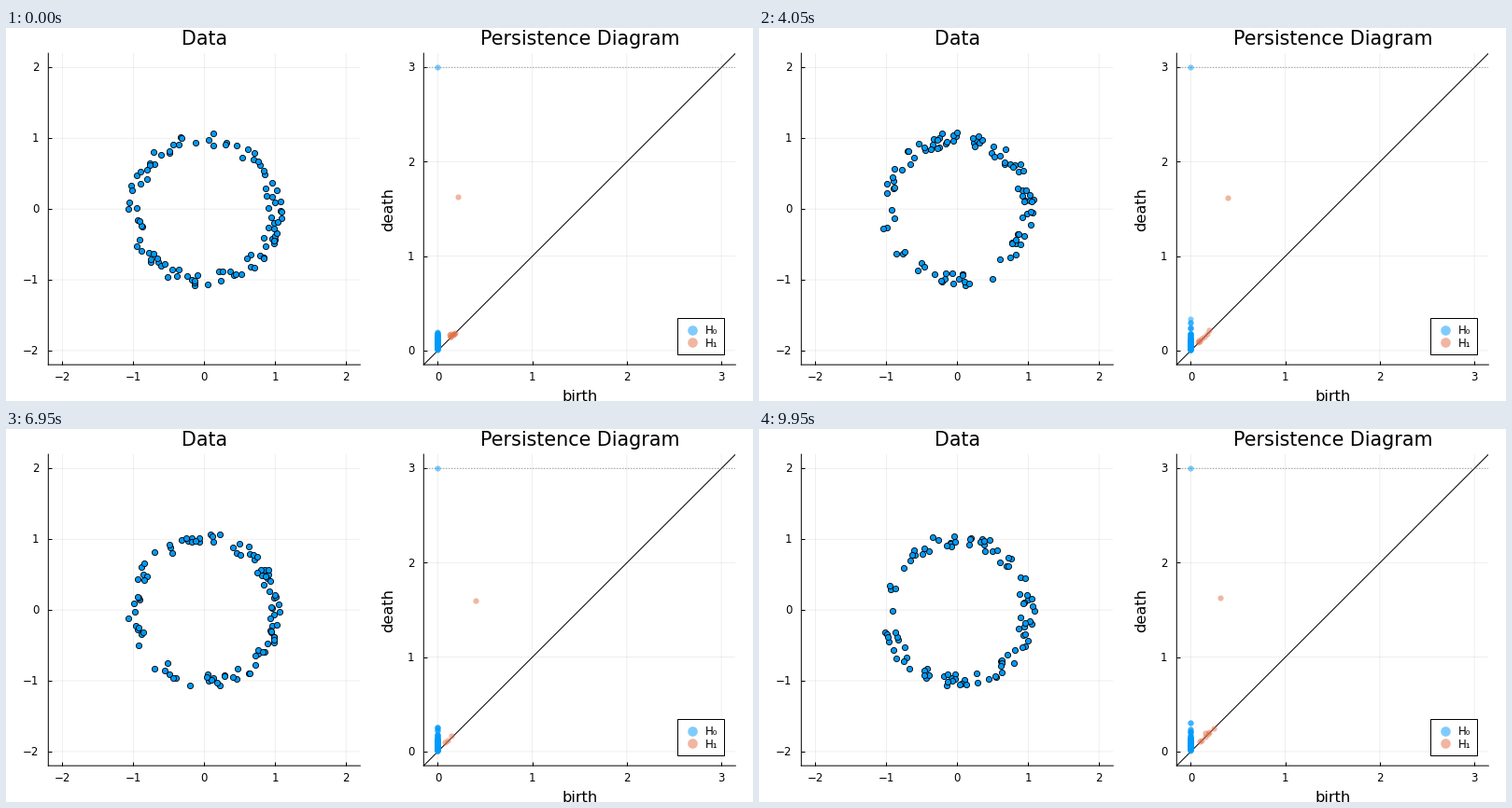
A matplotlib script that plays this animation: 800 by 400 pixels, repeating every 10 s.

```python
import numpy as np
import matplotlib.pyplot as plt
from matplotlib.animation import FuncAnimation
from matplotlib.patches import Rectangle

W, H, DPI = 800, 400, 100
FRAMES, INTERVAL = 200, 50
N = 100
BLUE, RED = "#009AFA", "#E36F47"
PX = 72 / DPI  # one pixel in points
SMALL, MEDIUM, LARGE = 8.5, 11.7, 14.9

plt.rcParams["font.family"] = "DejaVu Sans"
fig = plt.figure(figsize=(W / DPI, H / DPI), dpi=DPI, facecolor="white")


def label(x, y, text, size=SMALL, ha="center", **kw):
    fig.text(x / W, 1 - y / H, text, fontsize=size, ha=ha, va="baseline", **kw)


def make_axes(left, lim, ticks, title):
    top, side = 27.1, 334
    ax = fig.add_axes([left / W, 1 - (top + side) / H, side / W, side / H])
    ax.set(xlim=lim, ylim=lim, xticks=ticks, yticks=ticks)
    ax.patch.set_visible(False)
    ax.set_axisbelow(True)
    ax.grid(color="black", alpha=0.1, lw=0.45)
    plt.setp(ax.get_xgridlines() + ax.get_ygridlines(), snap=False)
    ax.spines[["top", "right"]].set_visible(False)
    for name in ("left", "bottom"):
        ax.spines[name].set(linewidth=PX, snap=False)
    ax.tick_params(direction="in", length=4 * PX, width=PX,
                   labelleft=False, labelbottom=False)
    for t in ticks:
        pos = (t - lim[0]) / (lim[1] - lim[0]) * side
        text = str(t).replace("-", "\u2212")
        label(left + pos, 378, text)
        label(left - 10, top + side - pos + 4.2, text, ha="right")
    label(left + side / 2, 18, title, LARGE)
    return ax


def sample_circle(seed):
    """Points at random angles in a thin ring around the unit circle."""
    rng = np.random.default_rng(seed)
    angle = rng.uniform(0, 2 * np.pi, N)
    radius = rng.uniform(0.9, 1.1, N)
    return radius * np.cos(angle), radius * np.sin(angle)


def clash(rows, u, v, both, low):
    """Triangles on edge uv where a cocycle cannot be extended, as bits."""
    x = (rows[u] ^ rows[v]) & both
    return x ^ both if x & low else x


def persistence(x, y):
    """Rips persistence: H0 deaths and H1 (birth, death) pairs."""
    i, j = np.triu_indices(N, 1)
    dist = np.hypot(x[i] - x[j], y[i] - y[j])
    order = np.argsort(dist)
    edges = zip(i[order].tolist(), j[order].tolist(), dist[order].tolist())

    near = [0] * N         # neighbours of each point, as bits
    comp = list(range(N))  # component of each point
    loops = []             # living classes: (birth, cocycle rows)
    h0, h1 = [], []
    for u, v, r in edges:
        both = near[u] & near[v]
        if both:
            low = both & -both
            while True:
                bad = [c for c in loops if clash(c[1], u, v, both, low)]
                if not bad:
                    break
                # The youngest class dies and repairs the older ones.
                young = bad.pop()
                x_young = clash(young[1], u, v, both, low)
                pivot = x_young & -x_young
                for _, rows in bad:
                    if clash(rows, u, v, both, low) & pivot:
                        rows[:] = [a ^ b for a, b in zip(rows, young[1])]
                loops = [c for c in loops if c is not young]
                h1.append((young[0], r))
            for _, rows in loops:
                if (rows[u] ^ rows[v]) & low:
                    rows[u] |= 1 << v
                    rows[v] |= 1 << u
        elif comp[u] != comp[v]:
            old, new = comp[u], comp[v]
            comp = [new if c == old else c for c in comp]
            h0.append(r)
        else:
            rows = [0] * N
            rows[u], rows[v] = 1 << v, 1 << u
            loops.append((r, rows))
        near[u] |= 1 << v
        near[v] |= 1 << u
    return h0, h1


data_ax = make_axes(45.3, (-2.2, 2.2), range(-2, 3), "Data")
pd_ax = make_axes(447.3, (-0.15, 3.15), range(4), "Persistence Diagram")
label(614.3, 400, "birth", MEDIUM)
label(414, 194, "death", MEDIUM, rotation=90, rotation_mode="anchor")

points, = data_ax.plot([], [], "o", ms=6.2 * PX, mfc=BLUE, mec="black",
                       mew=0.85 * PX)

pd_ax.plot([-0.15, 3.15], [-0.15, 3.15], color="black", lw=PX)
pd_ax.plot([-0.15, 3.15], [3, 3], color="#808080", lw=PX, snap=False,
           ls=(0, (1, 2)), dash_capstyle="butt")
dot = dict(ls="none", marker="o", ms=6.2 * PX, mew=0, alpha=0.5)
h0_dots, = pd_ax.plot([], [], color=BLUE, zorder=3, **dot)
h1_dots, = pd_ax.plot([], [], color=RED, zorder=3, **dot)

# Legend
fig.add_artist(Rectangle((719 / W, 1 - 350 / H), 50 / W, 39 / H,
                         transform=fig.transFigure, fc="white", ec="black",
                         lw=PX))
for y, color, text in ((324, BLUE, "H\u2080"), (337.3, RED, "H\u2081")):
    fig.add_artist(plt.Line2D([734.5 / W], [1 - y / H], color=color,
                              **{**dot, "ms": 10.6 * PX}))
    label(749, y + 4.2, text, ha="left")


def update(frame):
    x, y = sample_circle(frame)
    h0, h1 = persistence(x, y)
    points.set_data(x, y)
    h0_dots.set_data([0] * N, h0 + [3])
    h1_dots.set_data([b for b, _ in h1], [d for _, d in h1])
    return points, h0_dots, h1_dots


anim = FuncAnimation(fig, update, frames=FRAMES, interval=INTERVAL,
                     repeat=True, repeat_delay=0)
plt.show()
```
